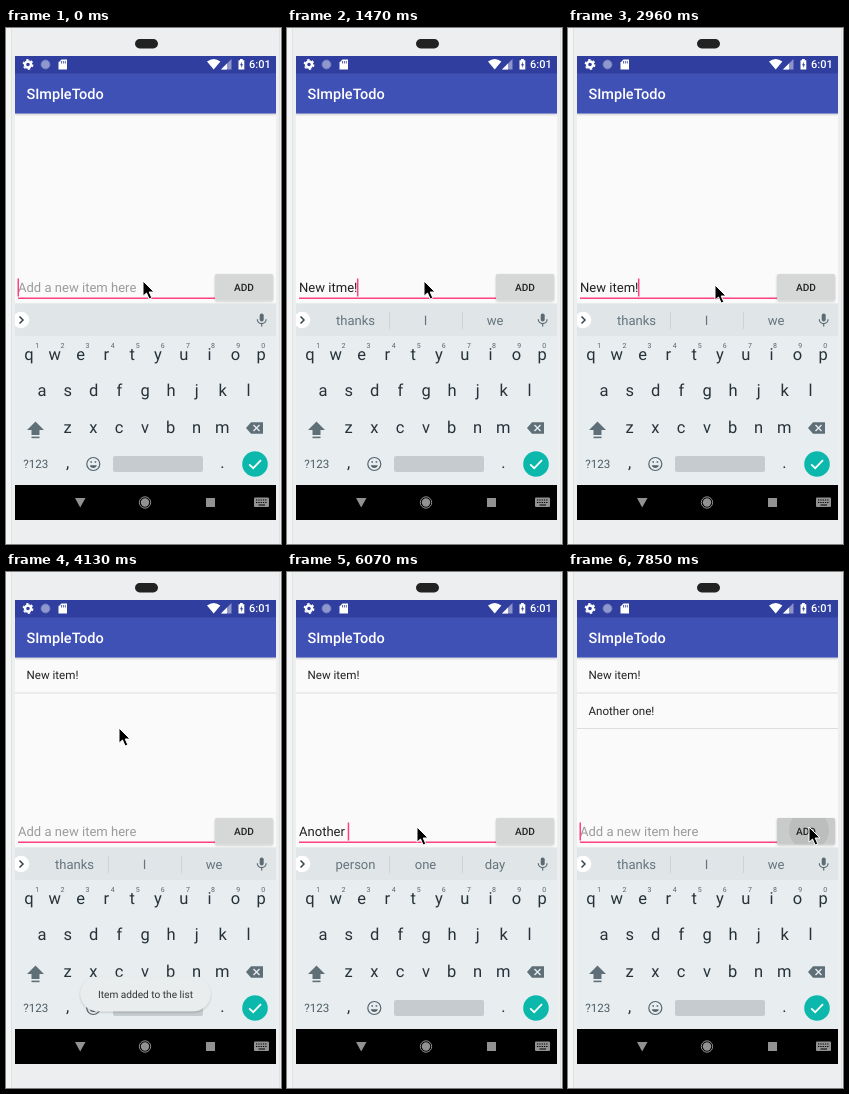
An HTML page for the animation above (8000 ms loop, 275 px wide and 516 px high).

```html
<!DOCTYPE html>
<html lang="en">
<head>
<meta charset="utf-8">
<title>Todo list demo</title>
<style>
  html, body { margin: 0; width: 100%; height: 100%; overflow: hidden; background: #eceeef; }
  svg { display: block; width: 275px; height: 516px; font-family: Roboto, sans-serif; }
  text { white-space: pre; text-rendering: geometricPrecision; }
  .mid { text-anchor: middle; }
  .entry { font-size: 13.05px; fill: #212121; }
  .row { font-size: 11.6px; fill: #212121; }
  .key { font-size: 16.5px; fill: #263238; }
  .digit { font-size: 7px; fill: #55656d; }
  .hint { font-size: 13.05px; fill: #64747c; }
  #toast { animation: toast 8s step-end infinite; }
  @keyframes toast {
    0% { opacity: 0; }
    48% { opacity: .6; }
    49.75% { opacity: 1; }
    74% { opacity: .5; }
    75.875% { opacity: 0; }
  }
</style>
</head>
<body>
<svg viewBox="0 0 275 516">
  <defs>
    <filter id="soft" x="-20%" y="-40%" width="140%" height="190%">
      <feDropShadow dx="0" dy="1" stdDeviation="1" flood-opacity=".22"/>
    </filter>
    <clipPath id="screen"><rect x="9" y="28" width="261" height="464"/></clipPath>
    <clipPath id="buttonShape"><rect x="209" y="246" width="58" height="26.5" rx="1.5"/></clipPath>
  </defs>

  <!-- Phone body -->
  <rect width="275" height="516" fill="#eceeef"/>
  <rect width="5" height="516" fill="#f3f4f4"/>
  <path d="M5.5 0V516M273.5 0V516" stroke="#dfe1e2"/>
  <rect x="129" y="11" width="23" height="9.5" rx="4.7" fill="#222"/>

  <g clip-path="url(#screen)">
    <rect x="9" y="28" width="261" height="248" fill="#fafafa"/>

    <g id="rows"></g>

    <!-- App bar and status bar -->
    <rect x="9" y="45" width="261" height="40.5" fill="#3f51b5" filter="url(#soft)"/>
    <rect x="9" y="28" width="261" height="17.4" fill="#303f9f"/>
    <text x="20.5" y="71" font-size="14.5" font-weight="500" fill="#fff">SImpleTodo</text>
    <g fill="#fff">
      <circle cx="22" cy="36.5" r="3" fill="none" stroke="#fff" stroke-width="2.4"/>
      <circle cx="22" cy="36.5" r="4.6" fill="none" stroke="#fff" stroke-width="1.6" stroke-dasharray="2.4 2.417"/>
      <circle cx="39.5" cy="36.5" r="4.4" fill="#8f98cd" stroke="#747fc0"/>
      <path d="M55.5 31.5H61V41.5H52.5V34.5Z"/>
      <path d="M55.5 33v2.5M57.4 33v2.5M59.3 33v2.5" stroke="#303f9f" stroke-width=".8"/>
      <path d="M201 33.5Q207.7 28.5 214.4 33.5L207.7 41.5Z"/>
      <path d="M225.5 31V41.5H215Z" opacity=".45"/>
      <path d="M221 35.5V41.5H215Z"/>
      <path d="M232.5 32.2H234V31H236.8V32.2H238.3V41.5H232.5Z"/>
      <path d="M236 33.5L234 37.3H235.3V40L237 36.3H235.7Z" fill="#303f9f"/>
      <text x="243" y="40.3" font-size="11" font-weight="500">6:01</text>
    </g>

    <!-- Input row -->
    <text id="placeholder" class="entry" x="12" y="264.4" style="fill:#9b9b9b">Add a new item here</text>
    <text id="typed" class="entry" x="12" y="264.4"></text>
    <rect id="composing" y="266" height="1" fill="#333"/>
    <rect x="12" y="269.5" width="197" height="1.5" fill="#ff4081"/>
    <rect id="caret" y="250.5" width="1.5" height="18" fill="#ff4081"/>
    <rect id="button" x="209" y="246" width="58" height="26.5" rx="1.5" fill="#d6d7d7" filter="url(#soft)"/>
    <circle id="ripple" cx="241" cy="258" r="20" fill="#b7b9b9" clip-path="url(#buttonShape)"/>
    <text class="mid" x="238" y="262.7" font-size="10.15" font-weight="500" fill="#212121">ADD</text>

    <!-- Keyboard -->
    <rect x="9" y="275.5" width="261" height="182" fill="#e8edf0"/>
    <rect x="9" y="275.5" width="261" height="32.5" fill="#e0e5e8"/>
    <circle cx="15" cy="292" r="8.3" fill="#fff"/>
    <path d="M13.5 288.5L17 292L13.5 295.5" fill="none" stroke="#37474f" stroke-width="1.5"/>
    <g id="hints">
      <path d="M102.5 284V301M175.5 284V301" stroke="#cdd3d6"/>
      <text class="hint mid" x="68.5" y="297"></text>
      <text class="hint mid" x="138.5" y="297"></text>
      <text class="hint mid" x="208" y="297"></text>
    </g>
    <rect x="253.7" y="285.5" width="4" height="8" rx="2" fill="#5c6b73"/>
    <path d="M251.3 291.3a4.4 4.4 0 0 0 8.8 0M255.7 295.8V298.5" fill="none" stroke="#5c6b73" stroke-width="1.2"/>
    <g id="keys"></g>
    <g fill="#5f6f77">
      <path d="M29.5 393.5L38 402H33.5V407H25.5V402H21Z"/>
      <rect x="25.5" y="408.6" width="8" height="1.6"/>
      <path d="M240 400L245 394.3H257V405.7H245Z"/>
    </g>
    <path d="M247.5 397L253.5 403M253.5 397L247.5 403" stroke="#e8edf0" stroke-width="1.4"/>
    <text class="mid" x="29.7" y="440" font-size="11.6" fill="#4c5c64">?123</text>
    <text class="key mid" x="61.5" y="440">,</text>
    <text class="key mid" x="216.5" y="440">.</text>
    <g fill="none" stroke="#55656d" stroke-width="1.2">
      <circle cx="87.3" cy="436" r="6.5"/>
      <path d="M83.8 437.3a3.6 3.6 0 0 0 7 0Z" fill="#55656d" stroke="none"/>
      <path d="M84.4 434h1.6M88.6 434h1.6" stroke-width="1.6"/>
    </g>
    <rect x="107" y="428" width="90" height="16" rx="2" fill="#c5cbce"/>
    <circle cx="249" cy="436" r="12.8" fill="#0bb8ab"/>
    <path d="M243.2 436.3L247.2 440.2L255 432.2" fill="none" stroke="#fff" stroke-width="1.7"/>

    <!-- Navigation bar -->
    <rect x="9" y="457" width="261" height="35" fill="#000"/>
    <g fill="#929292">
      <path d="M69 470H79.5L74.2 479.5Z"/>
      <circle cx="139" cy="474.5" r="4.2"/>
      <circle cx="139" cy="474.5" r="5.7" fill="none" stroke="#929292"/>
      <rect x="200" y="470" width="9" height="9"/>
      <rect x="248" y="469.5" width="15" height="9.5" rx="1"/>
    </g>
    <path d="M250 472H261.5M250 474.5H261.5" stroke="#000" stroke-dasharray="1.3 1"/>
    <path d="M252.5 477H259" stroke="#000"/>

    <g id="toast">
      <rect x="74.5" y="404.8" width="130" height="34.4" rx="17.2" fill="#eaedee" filter="url(#soft)"/>
      <text class="mid" x="139.5" y="426" font-size="10.15" fill="#333">Item added to the list</text>
    </g>
  </g>

  <path id="pointer" d="M0 0V15.2L3.5 12L6.1 18L8.8 16.8L6.2 11H11Z" fill="#000" stroke="#fff" stroke-width="1" stroke-linejoin="round"/>
</svg>

<script>
const LOOP = 8000;
const svg = document.querySelector('svg');
const el = id => document.getElementById(id);

function add(parent, tag, attrs, content = '') {
  const node = document.createElementNS('http://www.w3.org/2000/svg', tag);
  for (const name in attrs) node.setAttribute(name, attrs[name]);
  node.textContent = content;
  parent.append(node);
  return node;
}

function addKeys(letters, x, y) {
  [...letters].forEach((letter, i) =>
    add(el('keys'), 'text', { class: 'key mid', x: x + i * 25.8, y }, letter));
}
addKeys('qwertyuiop', 23, 332);
addKeys('asdfghjkl', 36, 368.3);
addKeys('zxcvbnm', 61.5, 405);
[...'1234567890'].forEach((digit, i) =>
  add(el('keys'), 'text', { class: 'digit mid', x: 31.3 + i * 25.1, y: 320 }, digit));

const rows = ['New item!', 'Another one!'].map((label, i) => {
  const row = add(el('rows'), 'g', {});
  const top = 86 + i * 35.5;
  add(row, 'text', { class: 'row', x: 20.5, y: top + 21.2 }, label);
  add(row, 'rect', { x: 9, y: top + 34.5, width: 261, height: 1, fill: '#dedede' });
  return row;
});
const rowTimes = [3690, 7850];

// [time, text, start of the underlined word (-1 for none), suggestions]
const idle = 'thanks,I,we';
const typing = [
  [0, '', -1, ''],
  [740, 'N', 0, 'N,No,Not'],
  [880, 'New', 0, 'New,news,newer'],
  [1030, 'New i', 4, 'i,I,is'],
  [1180, 'New it', 4, 'it,its,it\'s'],
  [1330, 'New itme', 4, 'itme,time,item'],
  [1470, 'New itme!', -1, idle],
  [1920, 'New itme', 4, 'itme,time,item'],
  [2070, 'New it', 4, 'it,its,it\'s'],
  [2520, 'New ite', 4, 'ite,item,items'],
  [2660, 'New item', 4, 'item,items,items'],
  [2810, 'New item!', -1, idle],
  [3690, '', -1, idle],
  [5180, 'A', 0, 'A,And,At'],
  [5320, 'An', 0, 'An,And,Any'],
  [5470, 'Ano', 0, 'Ano,Another,Any'],
  [5620, 'Anoth', 0, 'Anoth,Another,Other'],
  [5770, 'Anothe', 0, 'Anothe,Another,Other'],
  [5920, 'Another', 0, 'Another,Anothers,Other'],
  [6070, 'Another ', -1, 'person,one,day'],
  [6370, 'Another o', 8, 'o,of,on'],
  [6670, 'Another on', 8, 'on,one,only'],
  [6820, 'Another one', 8, 'on,one,only'],
  [6970, 'Another one', 8, 'one,ones,on'],
  [7260, 'Another one!', -1, idle],
  [7850, '', -1, idle],
];

const pointerPath = [
  [0, 137, 253], [2810, 139, 254], [2960, 147, 257], [3100, 178, 259],
  [3250, 217, 258], [3400, 237, 255], [3690, 238, 254], [3840, 226, 247],
  [3980, 160, 188], [4130, 113, 156], [4280, 112, 160], [4430, 115, 186],
  [4580, 122, 222], [4730, 127, 243], [4880, 130, 255],
  [7410, 152, 256], [7560, 204, 257], [7700, 241, 255],
];

const caretSteps = [[0, 1], [290, 0], [740, 1], [4130, 0], [4580, 1]];
const rippleSteps = [[0, 0], [3540, .5], [3690, 1], [3840, .5], [3980, 0], [7700, .4], [7850, 1]];

const at = (steps, t) => steps.findLast(step => step[0] <= t);
const show = (node, visible) => node.setAttribute('opacity', +visible);

const pen = document.createElement('canvas').getContext('2d');
pen.font = '130.5px Roboto, sans-serif';
const widthOf = text => pen.measureText(text).width / 10;

const hintTexts = el('hints').querySelectorAll('text');

function draw(t) {
  const [, text, from, hints] = at(typing, t);
  const end = 12 + widthOf(text);
  el('typed').textContent = text;
  show(el('placeholder'), !text);
  el('caret').setAttribute('x', end - .5);
  show(el('caret'), at(caretSteps, t)[1]);

  const start = from < 0 ? end : 12 + widthOf(text.slice(0, from));
  el('composing').setAttribute('x', start);
  el('composing').setAttribute('width', end - start);

  show(el('hints'), hints);
  if (hints) hints.split(',').forEach((word, i) => hintTexts[i].textContent = word);
  el('hints').style.display = hints ? '' : 'none';

  rows.forEach((row, i) => show(row, t >= rowTimes[i]));

  const press = at(rippleSteps, t)[1];
  show(el('ripple'), press * .7);
  el('button').setAttribute('fill', press ? '#c9caca' : '#d6d7d7');

  const [, x, y] = at(pointerPath, t);
  el('pointer').setAttribute('transform', `translate(${x} ${y})`);
}

const toast = el('toast').getAnimations()[0];
function tick() {
  const now = performance.now();
  if (toast) toast.currentTime = now % LOOP;
  draw(now % LOOP);
  requestAnimationFrame(tick);
}
tick();
</script>
</body>
</html>
```
